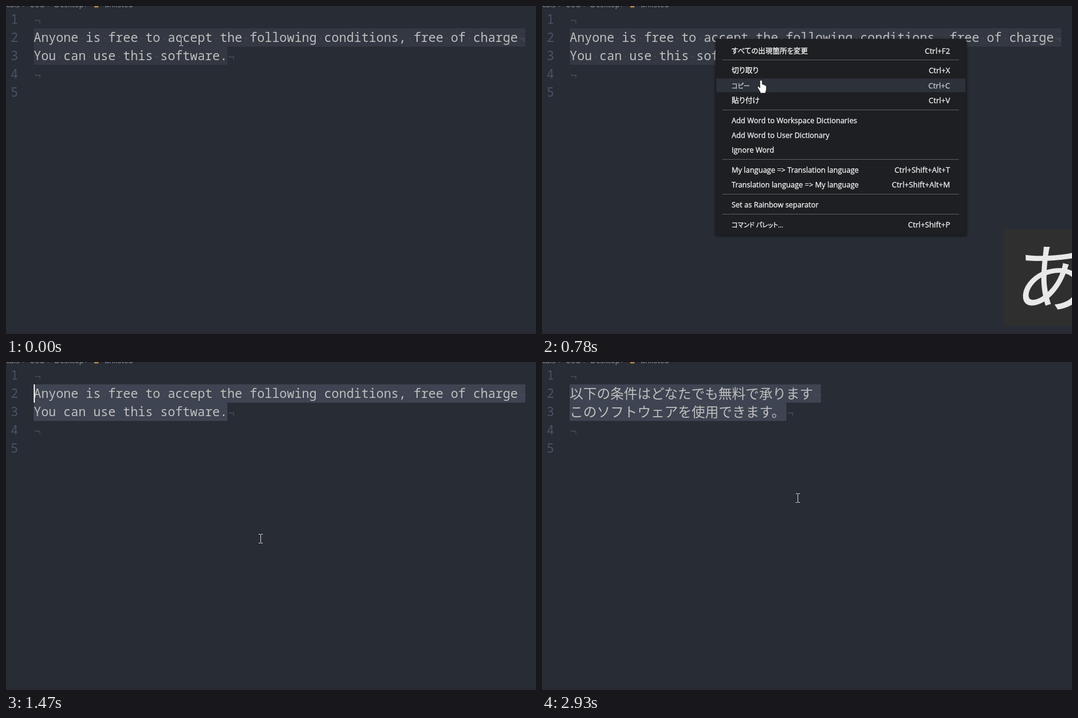
Write an HTML page that moves like this. It is 900 px wide and 557 px high and loops after 3170 ms.

```html
<!DOCTYPE html>
<html lang="ja">
<head>
<meta charset="utf-8">
<style>
  html, body { margin: 0; width: 100%; height: 100%; overflow: hidden; background: #282c34; }
  svg { display: block; width: 900px; height: 557px; }
  .code { font: 21.08px "Noto Sans Mono", monospace; fill: #bfbfbf; }
  .cjk { font: 23px "Noto Sans CJK JP", "Noto Sans CJK", sans-serif; fill: #bfbfbf; }
  .num { fill: #4c5267; }
  .crumb { font: 13px "Open Sans", sans-serif; fill: #9a9fa8; }
  .blank { fill: none; stroke: #484d57; stroke-width: 1.5; }
  .item {
    font: 12.5px "Open Sans", "Noto Sans CJK JP", "Noto Sans CJK", sans-serif;
    font-feature-settings: "palt"; fill: #f4f4f4; stroke: #f4f4f4; stroke-width: .3;
  }
  .item.hover { fill: #c8ccd3; stroke: #c8ccd3; }
  .keys { font-size: 13px; text-anchor: end; }
  .panel { fill: #1e1f23; filter: drop-shadow(0 1px 2px rgba(0, 0, 0, .7)); }
  .ime { font: 126px "Noto Sans CJK JP", "Noto Sans CJK", sans-serif; fill: #e8e8e8; text-anchor: middle; }
</style>
</head>
<body>
<svg id="stage" viewBox="0 0 900 557"></svg>
<script>
const LOOP = 3170, LEFT = 47, CELL = 12.65, LINE = 31;
const MENU_OPEN = 460, MENU_CLOSE = 1470;
const stage = document.getElementById('stage');

function add(parent, tag, attrs = {}, text) {
  const node = document.createElementNS('http://www.w3.org/2000/svg', tag);
  for (const key in attrs) node.setAttribute(key, attrs[key]);
  if (text !== undefined) node.textContent = text;
  parent.appendChild(node);
  return node;
}
const group = (parent = stage) => add(parent, 'g');
const rect = (parent, x, y, width, height, fill) =>
  add(parent, 'rect', { x, y, width, height, fill });
const label = (parent, x, y, cls, text) => add(parent, 'text', { x, y, class: cls }, text);
const show = (node, on) => node.setAttribute('display', on ? 'inline' : 'none');
const rowTop = row => 38 + (row - 2) * LINE;

// Editor
rect(stage, 0, 553, 900, 4, '#2a2933');
[[0, 'cals'], [28, '›'], [40, 'USO'], [70, '›'], [82, 'Desktop'], [134, '›'], [167, 'unlisted']]
  .forEach(([x, text]) => label(stage, x, 1.5, 'crumb', text));
rect(stage, 150, 0, 7, 2.5, '#b9834f');
for (let row = 1; row <= 5; row++) label(stage, 8, rowTop(row) + 23, 'code num', row);

function endMark(parent, x, row) {
  add(parent, 'path', { class: 'blank', d: `M${x + 2} ${rowTop(row) + 17.5}h8.5v4.5` });
}
endMark(stage, LEFT, 1);
endMark(stage, LEFT, 4);

// One selected line of text; the first one also selects its line break.
function codeLine(row, text, japanese) {
  const g = group();
  const end = LEFT + text.length * (japanese ? 23 : CELL);
  const back = rect(g, LEFT, rowTop(row), end - LEFT + (row === 2 ? CELL : 0), LINE);
  back.setAttribute('rx', 1.5);
  [...text].forEach((char, i) => {
    if (char === ' ') rect(g, LEFT + (i + .5) * CELL - 1, rowTop(row) + 16, 2, 2, '#484d57');
  });
  endMark(g, end, row);
  label(g, LEFT, rowTop(row) + (japanese ? 23.7 : 23), japanese ? 'cjk' : 'code', text);
  return { g, back };
}
const english = [
  codeLine(2, 'Anyone is free to accept the following conditions, free of charge'),
  codeLine(3, 'You can use this software.')
];
const translated = [
  codeLine(2, '以下の条件はどなたでも無料で承ります', true),
  codeLine(3, 'このソフトウェアを使用できます。', true)
];
const caret = rect(stage, LEFT, 38, 2, LINE, '#f4f4f4');

// Input mode badge
const badge = group();
rect(badge, 784, 379, 160, 164, '#2f2f30');
label(badge, 866, 509, 'ime', 'あ');

// Context menu
const menu = group();
add(menu, 'rect', { x: 295, y: 56, width: 425.5, height: 333, class: 'panel' });
const hoverBar = rect(menu, 296, 0, 423, 23.5, '#2c313a');
[91, 176, 260, 319, 353].forEach(y => rect(menu, 306, y, 402, 1, '#5a5b5e'));
const items = [
  [76, 'すべての出現箇所を変更', 'Ctrl+F2', 12.2],
  [109, '切り取り', 'Ctrl+X'],
  [135, 'コピー', 'Ctrl+C', 10.8],
  [160, '貼り付け', 'Ctrl+V'],
  [194, 'Add Word to Workspace Dictionaries', ''],
  [219, 'Add Word to User Dictionary', ''],
  [244, 'Ignore Word', ''],
  [278, 'My language => Translation language', 'Ctrl+Shift+Alt+T'],
  [303, 'Translation language => My language', 'Ctrl+Shift+Alt+M'],
  [337, 'Set as Rainbow separator', ''],
  [371, 'コマンド パレット...', 'Ctrl+Shift+P', 11]
].map(([y, name, keys, size]) => {
  const title = label(menu, 322, y + 4.7, 'item', name);
  if (size) title.style.fontSize = size + 'px';
  return { y, labels: [title, label(menu, 693, y + 4.7, 'item keys', keys)] };
});

// Pointers, each drawn around its hot spot
const pointer = group();
const shapes = {
  beam: add(pointer, 'path', {
    d: 'M-3.5-7.5h3m1 0h3M0-7v14M-3.5 7.5h3m1 0h3', fill: 'none', stroke: '#d8d8d8'
  }),
  arrow: add(pointer, 'path', {
    d: 'M0 0V16.5L3.8 13l2.8 6.2 2.7-1.2-2.7-6H11.5Z', fill: '#fff', stroke: '#111', 'stroke-width': .8
  }),
  hand: add(pointer, 'path', {
    d: 'M-2 1.5Q-2 0 0 0Q2 0 2 1.5V7q2.5-.8 2.5 1q2.5-.6 2.5 1q2-.4 2 1.5V15Q9 18 7.8 19.5V22H-1.5V20' +
       'Q-2.5 18-5.5 13.5Q-7 11-5 10.5Q-3.5 10.5-2 13Z',
    fill: '#fff', stroke: '#111', 'stroke-width': .8
  })
};

const pointerSteps = [
  [0, 297.5, 60], [220, 297.5, 56], [380, 288, 51], [460, 297, 56], [620, 306, 62], [700, 337, 90],
  [780, 372, 126], [860, 403, 160], [930, 424.5, 207], [1010, 428, 230], [1090, 431, 259],
  [1160, 432.5, 285], [1240, 432.5, 295], [1310, 432.5, 300], [1630, 433.5, 280],
  [1690, 434.5, 250], [1760, 434.5, 231]
];
const badgeSteps = [
  [0, 0], [460, .7], [530, 1], [930, .95], [1010, .8], [1090, .61], [1160, .4], [1240, .18], [1310, 0]
];
const stepAt = (steps, t) => steps.filter(step => step[0] <= t).pop();
const between = (t, from, to) => t >= from && t < to;

function render(t) {
  const [, x, y] = stepAt(pointerSteps, t);
  const open = between(t, MENU_OPEN, MENU_CLOSE);
  const hovered = open ? items.find(item => y >= item.y - 12 && y < item.y + 12) : null;

  show(menu, open);
  show(hoverBar, hovered);
  if (hovered) hoverBar.setAttribute('y', hovered.y - 12);
  items.forEach(item => item.labels.forEach(node => node.classList.toggle('hover', item === hovered)));

  const shape = !open ? 'beam' : hovered ? 'hand' : 'arrow';
  for (const name in shapes) show(shapes[name], name === shape);
  pointer.setAttribute('transform', `translate(${x} ${y})`);
  badge.setAttribute('opacity', stepAt(badgeSteps, t)[1]);

  [2480, 2410].forEach((time, i) => {
    show(english[i].g, t < time);
    show(translated[i].g, t >= time);
  });
  const selection = t >= MENU_CLOSE ? '#3e4451' : '#333842';
  [...english, ...translated].forEach(line => line.back.setAttribute('fill', selection));
  show(caret, between(t, 1470, 1990) || between(t, 2410, 2930));
}

let start;
function tick(now) {
  start ??= now;
  render((now - start) % LOOP);
  requestAnimationFrame(tick);
}
render(0);
requestAnimationFrame(tick);
</script>
</body>
</html>
```
